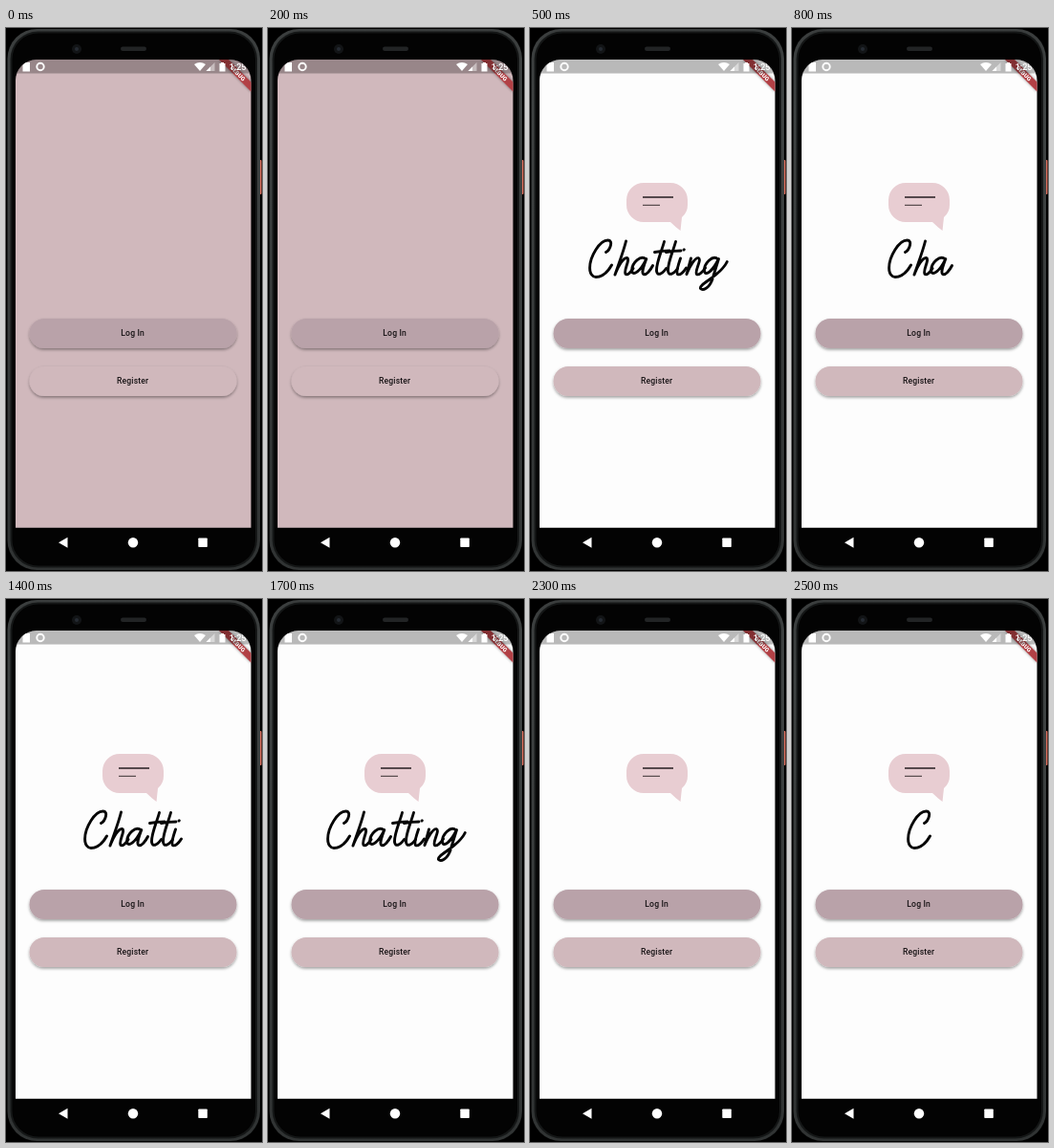
These frames come from a looping animation (268x568 px, 2.7 s). An HTML page:

```html
<!DOCTYPE html>
<html lang="en">
<head>
<meta charset="utf-8">
<title>Chat app welcome screen</title>
<style>
html, body { margin: 0; width: 100%; height: 100%; overflow: hidden; background: #000; }
svg { display: block; width: 100%; height: 100%; }
text { font-family: Roboto, sans-serif; text-anchor: middle; }
.label { font-size: 8.6px; font-weight: 500; letter-spacing: .12px; fill: #171315; }
#word path { fill: none; stroke: #050505; stroke-width: 2.9; stroke-linecap: round; stroke-linejoin: round; }
</style>
</head>
<body>
<svg viewBox="0 0 268 568">
  <defs>
    <clipPath id="glass"><path d="M10 522.700V55A22 22 0 0 1 32 33H234.500A22 22 0 0 1 256.500 55V522.700Z"/></clipPath>
    <linearGradient id="rim" x2="0" y2="1">
      <stop offset="0" stop-color="#3a3d3d"/>
      <stop offset=".15" stop-color="#3f4343"/>
      <stop offset="1" stop-color="#303333"/>
    </linearGradient>
    <filter id="shadow" x="-10%" y="-30%" width="120%" height="180%">
      <feDropShadow dx="0" dy="1.6" stdDeviation="1.7" flood-opacity=".38"/>
    </filter>
    <filter id="glow" x="-30%" y="-30%" width="160%" height="160%">
      <feDropShadow dx="0" dy="0" stdDeviation="1.4" flood-opacity=".45"/>
    </filter>
  </defs>

  <rect width="268" height="568"/>
  <rect x="264.500" y="138" width="3" height="36" rx="1" fill="#d9705f"/>
  <rect x="1.500" y="1" width="264.500" height="566" rx="31" fill="url(#rim)"/>
  <rect x="4.500" y="3.500" width="258.500" height="561" rx="29" fill="#151717"/>
  <rect x="6.500" y="5.500" width="254.500" height="557" rx="27" fill="#030303"/>
  <circle cx="74" cy="22" r="5" fill="#121416"/>
  <circle cx="74" cy="22" r="2" fill="#252a32"/>
  <rect x="120" y="19.500" width="27" height="4.500" rx="2.200" fill="#222425"/>

  <g clip-path="url(#glass)">
    <rect id="page" x="10" y="33" width="247" height="490"/>
    <g id="logo">
      <path fill="#e8cdd2" d="M119 162H147A18 18 0 0 1 165 180V185Q165 193 159 198L157.500 212Q152 208 147 203H119A18 18 0 0 1 101 185V180A18 18 0 0 1 119 162Z"/>
      <g stroke="#251c1f">
        <path d="M118 177H150" stroke-width="1.300"/>
        <path d="M118 185.300H136" stroke-width=".9"/>
      </g>
      <g id="word"></g>
    </g>
    <g filter="url(#shadow)">
      <rect x="24.500" y="304" width="217" height="31" rx="15.500" fill="#b9a2a9"/>
      <rect x="24.500" y="354" width="217" height="31" rx="15.500" fill="#d0b8bc"/>
    </g>
    <text class="label" x="132.600" y="321.900">Log In</text>
    <text class="label" x="132.600" y="371.900">Register</text>

    <path d="M223 33H233L257 57V67Z" fill="#b23f45" filter="url(#glow)"/>
    <text transform="translate(242.6 47.4) rotate(45)" y="2.200" font-size="6.100" font-weight="900" fill="#fff">DEBUG</text>
    <rect x="10" y="33" width="247" height="14.500" opacity=".27"/>
    <g fill="#fff">
      <path d="M19.500 36H25V45.500H17.500V38.500Z"/>
      <circle cx="36" cy="40.500" r="3.700" fill="none" stroke="#fff" stroke-width="1.900"/>
      <path d="M197 38Q203 34 209 38L203 45Z"/>
      <path d="M218.500 36V45H209.500Z" opacity=".45"/>
      <path d="M214 40.500V45H209.500Z"/>
      <path d="M225 36H228V37H229.500V45.500H223.500V37H225Z"/>
      <text x="242.500" y="44.200" font-size="9" font-weight="500">1:25</text>
    </g>
  </g>

  <g fill="#fff">
    <path d="M55 538.300L64.500 532.800V543.800Z"/>
    <circle cx="133" cy="538.300" r="5.200"/>
    <rect x="201.300" y="533.500" width="9.500" height="9.500" rx=".8"/>
  </g>
</svg>
<script>
const $ = id => document.getElementById(id);

// Script lettering, one brush path per letter
const t = 'M140.500 223.500C138 233 132 246 132.500 254C133 259.500 138 258 142.500 251.500M130.500 234.500Q138 233 146 233';
const letters = [
  'M79.500 234.500C84 232 87.500 222 81.500 222C73 222 62.600 239 62.600 251C62.600 257 65.500 260.500 69 260.500C75 260.500 81 256 85.500 248',
  'M100.500 223C97.500 235 93 246 89 258C92 250 97.500 240 101.500 240.500C105.500 241.500 97.500 254 100 257.300C102 259 105.500 255.500 108 251.500',
  'M121.500 242C116 236.500 106.500 246 106.700 253.500C107 260.500 115.500 255 121.800 241.500C119 249 116.500 255.500 118.700 257.500C121.500 259 126 253.500 128.500 248.500',
  t,
  t,
  'M157.500 241C155.500 247 152.500 255 154.500 257.500C157 259 161 255 163.500 251M161 232L161.300 231.700',
  'M168.500 241L164 257.500C167 249.500 173 239.500 176.500 240.700C180 242.500 172 254.500 174.500 257.500C176.500 259 181 255 183.500 251',
  'M197 242C191 236.500 182 247 182.500 254C183.500 260.500 191.500 254 197.500 241.500L190.500 264C187.500 272 181 275 178.500 272.500C176.500 267.500 199 260 206.300 244.500'
];
$('word').innerHTML = letters
  .map((d, i) => `<path d="${d}"${i === 4 ? ' transform="translate(12)"' : ''}/>`).join('');

// Shift that keeps the word centred for each letter count
const shifts = [0, 59, 49, 39, 33, 27, 20, 10, 0];
// [start in ms, letters shown]
const typing = [[0, 0], [500, 8], [800, 3], [1200, 5], [1400, 6], [1500, 7], [1700, 8], [2300, 0], [2500, 1]];

function draw(now) {
  const time = now % 2700;
  const count = typing.filter(step => step[0] <= time).pop()[1];
  const loading = time < 500;
  $('page').setAttribute('fill', loading ? '#d0b8bc' : '#fdfdfd');
  $('logo').setAttribute('visibility', loading ? 'hidden' : 'visible');
  $('word').setAttribute('transform', `translate(${shifts[count]})`);
  [...$('word').children].forEach((path, i) => path.style.display = i < count ? '' : 'none');
}

const start = performance.now();
function frame() {
  draw(performance.now() - start);
  requestAnimationFrame(frame);
}
frame();
</script>
</body>
</html>
```
